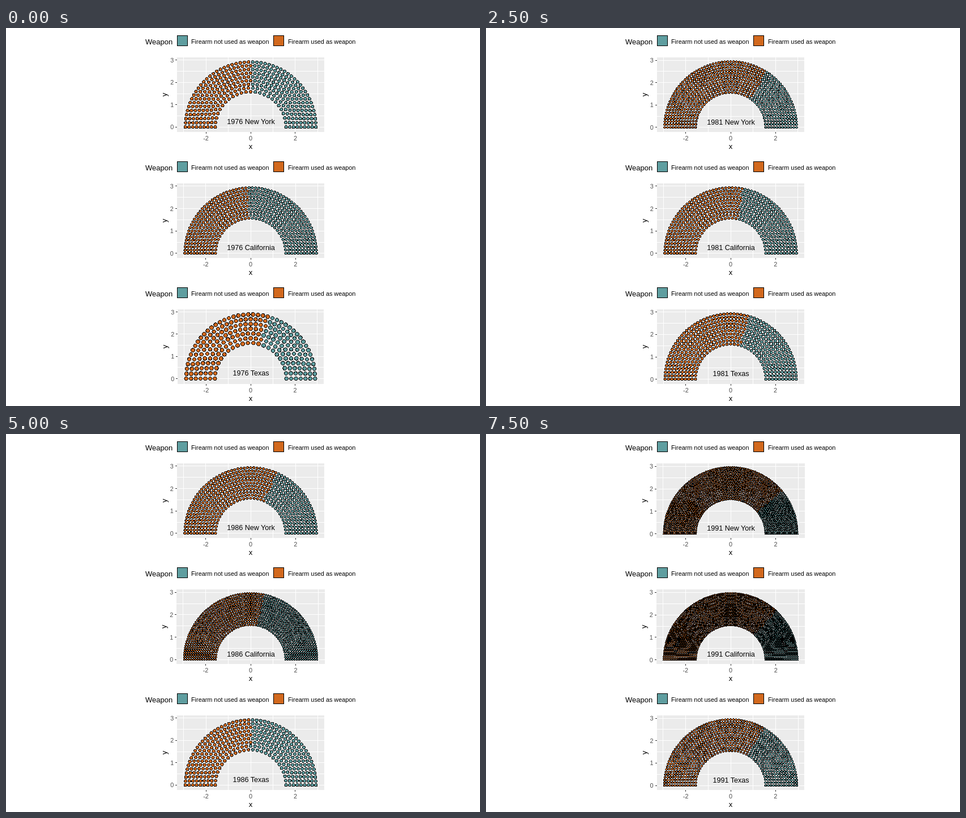
These frames come from a looping animation (837 px wide and 669 px high, 8000 ms). An HTML page:

```html
<!DOCTYPE html>
<html lang="en">
<head>
<meta charset="utf-8">
<title>Weapon use by state and year</title>
<style>
  html, body { margin: 0; width: 100%; height: 100%; overflow: hidden; background: #fff; }
  svg { display: block; font-family: "Liberation Sans", Arial, sans-serif; }
  .title { font-size: 13px; }
  .key { font-size: 10.85px; }
  .note { font-size: 12.6px; }
  .tick { font-size: 10.85px; fill: #4d4d4d; }
  .crisp { shape-rendering: crispEdges; }
</style>
</head>
<body>
<svg id="stage" width="837" height="669" viewBox="0 0 837 669"></svg>
<script>
const STEP = 500, YEARS = 16, FIRST_YEAR = 1976;
const TEAL = '#5f9ea0', ORANGE = '#d2691e';
const CENTER = 432, TOP = 51.5, BOTTOM = 184, ROW_HEIGHT = 223;
const INNER = 1.5, OUTER = 3;

// seats: dots per year; used: share of orange dots in thousandths
const states = [
  { name: 'New York',
    seats: [340, 480, 800, 1150, 900, 640, 650, 690, 740, 640, 540, 800, 1150, 1200, 1350, 1480],
    used: [505, 540, 580, 613, 650, 683, 675, 665, 655, 640, 627, 665, 707, 730, 755, 777] },
  { name: 'California',
    seats: [530, 650, 850, 1000, 750, 530, 620, 800, 870, 950, 1020, 900, 780, 1000, 1500, 1800],
    used: [487, 505, 520, 538, 550, 563, 565, 566, 567, 565, 563, 580, 600, 645, 690, 738] },
  { name: 'Texas',
    seats: [222, 250, 320, 490, 455, 460, 480, 410, 400, 360, 350, 290, 340, 430, 560, 740],
    used: [590, 590, 591, 592, 591, 590, 570, 547, 525, 513, 503, 525, 550, 585, 625, 663] }
];

const snap = v => Math.floor(v) + 0.5;
const text = (cls, x, y, str, anchor = 'start') =>
  `<text class="${cls}" x="${x}" y="${y}" text-anchor="${anchor}">${str}</text>`;
const lines = (d, color) => `<path class="crisp" d="${d}" stroke="${color}" fill="none"/>`;

// Half-ring seating: as many equally deep rows as the seats need.
function parliament(total) {
  const capacity = (rows, i) => Math.floor(Math.PI * (rows + 0.5 + i));
  let rows = 0, room = 0;
  while (room < total) {
    rows++;
    room = 0;
    for (let i = 0; i < rows; i++) room += capacity(rows, i);
  }
  const depth = (OUTER - INNER) / rows, spare = room - total, seats = [];
  for (let i = 0; i < rows; i++) {
    const count = capacity(rows, i) - Math.floor(spare / rows) - (spare % rows > i ? 1 : 0);
    const r = INNER + depth * (i + 0.5);
    for (let j = 0; j < count; j++) seats.push({ r, turn: j / (count - 1) });
  }
  seats.sort((a, b) => a.turn - b.turn || b.r - a.r);
  return { seats, radius: 0.4 * depth, reach: OUTER - 0.1 * depth };
}

// Circle with its vertices on whole pixels
function dot(cx, cy, r) {
  const points = [];
  for (let k = 0; k < 16; k++) {
    const a = k * Math.PI / 8;
    points.push(snap(cx + r * Math.cos(a)) + ' ' + snap(cy + r * Math.sin(a)));
  }
  return 'M' + points.join('L') + 'Z';
}

function legend() {
  const box = (x, color) =>
    `<rect class="crisp" x="${x}" y="13.5" width="18" height="18" fill="${color}" stroke="#000"/>`;
  return text('title', 246, 28.5, 'Weapon') +
    box(302.5, TEAL) + text('key', 327, 27.5, 'Firearm not used as weapon') +
    box(472.5, ORANGE) + text('key', 498, 27.5, 'Firearm used as weapon');
}

function chart(state, index) {
  const { seats, radius, reach } = parliament(state.seats[index]);
  const span = (reach + radius) * 1.1;
  const scale = (BOTTOM - TOP) / span;
  const X = x => CENTER + x * scale;
  const Y = y => BOTTOM - (y + radius + span / 22) * scale;
  const left = X(-1.1 * reach), right = X(1.1 * reach);

  let grid = '', ticks = '', labels = '';
  for (let x = -3; x <= 3; x++) grid += `M${snap(X(x))} ${TOP}V${BOTTOM}`;
  for (let y = 0; y <= 3; y += 0.5) grid += `M${left} ${snap(Y(y))}H${right}`;
  for (const x of [-2, 0, 2]) {
    ticks += `M${snap(X(x))} ${BOTTOM}v3`;
    labels += text('tick', X(x), 199, x, 'middle');
  }
  for (let y = 0; y <= 3; y++) {
    ticks += `M${left} ${snap(Y(y))}h-3`;
    labels += text('tick', left - 6, Math.round(Y(y) + 4), y, 'end');
  }

  const cut = Math.round(seats.length * state.used[index] / 1000);
  const dots = (list, color) => {
    const d = list.map(({ r, turn }) => dot(
      X(-r * Math.cos(Math.PI * turn)), Y(r * Math.sin(Math.PI * turn)), radius * scale)).join('');
    return `<path class="crisp" d="${d}" fill="${color}" stroke="#000" stroke-linejoin="round"/>`;
  };

  return `<rect class="crisp" x="${left}" y="${TOP}" width="${right - left}" height="${BOTTOM - TOP}" fill="#ebebeb"/>` +
    lines(grid, '#fff') + dots(seats.slice(cut), TEAL) + dots(seats.slice(0, cut), ORANGE) +
    lines(ticks, '#333') + labels +
    text('note', CENTER + 0.5, Math.round(Y(0.25) + 4.5), `${FIRST_YEAR + index} ${state.name}`, 'middle') +
    text('title', CENTER, 214, 'x', 'middle') +
    `<text class="title" text-anchor="middle" transform="translate(${left - 18} 118) rotate(-90)">y</text>`;
}

const stage = document.getElementById('stage');
let shown = -1;

function render(time) {
  const index = Math.floor(time / STEP) % YEARS;
  if (index === shown) return;
  shown = index;
  stage.innerHTML = states.map((state, i) =>
    `<g transform="translate(0 ${i * ROW_HEIGHT})">${legend()}${chart(state, index)}</g>`).join('');
}

const start = performance.now();
function loop() {
  render(performance.now() - start);
  requestAnimationFrame(loop);
}
loop();
</script>
</body>
</html>
```
